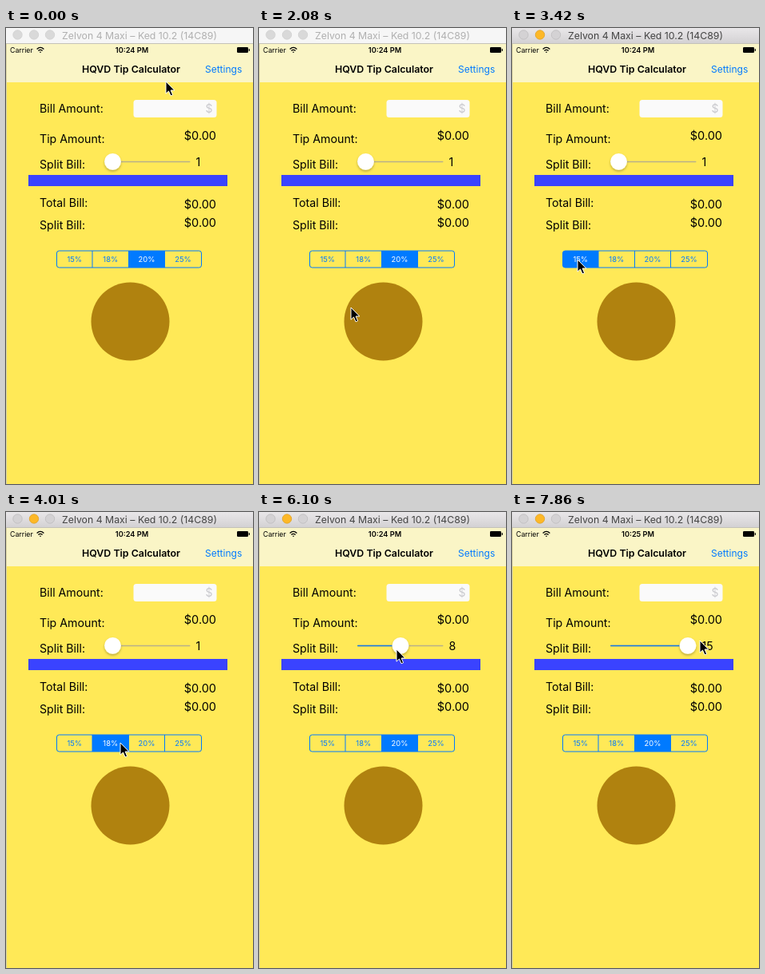
Write an HTML page that moves like this. It is 309 by 571 pixels and loops after 8000 ms.

```html
<!DOCTYPE html>
<html lang="en">
<head>
<meta charset="utf-8">
<title>Tip Calculator</title>
<style>
  html, body { margin: 0; width: 100%; height: 100%; overflow: hidden; background: #ffe957; }
  svg { display: block; width: 100%; height: 100%; }
  text { font-family: Inter, Roboto, "Liberation Sans", sans-serif; fill: #000; white-space: pre; }
  .label { font-size: 14.2px; }
  .value { font-size: 14.5px; text-anchor: end; }
  .heading { font-size: 12.4px; font-weight: 600; text-anchor: middle; }
  .status { font-size: 8.8px; }
  .clock { font-size: 9.2px; font-weight: 600; text-anchor: middle; }
  .link { font-size: 12px; fill: #007aff; }
  .hint { font-size: 14px; fill: #c9c9ce; text-anchor: end; }

  .bar { fill: #f6f6f6; }
  .caption { font-size: 12.3px; fill: #b0b0b0; }
  .dot { fill: #d9d9d9; stroke: #cecece; stroke-width: .8; }
  .active .bar { fill: url(#chrome); }
  .active .caption { fill: #444; }
  .active .dot { fill: #d4d2d4; stroke: #bdbbbd; }
  .active .dot.mid { fill: #fdb827; stroke: #dfa023; }

  .seg text { font-size: 9.4px; fill: #007aff; text-anchor: middle; }
  .seg rect { fill: transparent; }
  .seg.on rect { fill: #007aff; }
  .seg.on text { fill: #fff; }
  .outline { fill: none; stroke: #007aff; stroke-width: 1; }
</style>
</head>
<body>
<svg viewBox="0 0 309 571" preserveAspectRatio="none">
  <defs>
    <linearGradient id="chrome" x2="0" y2="1">
      <stop stop-color="#e9e7e9"/><stop offset="1" stop-color="#d3d1d3"/>
    </linearGradient>
    <clipPath id="pill"><rect x="63.5" y="279" width="181" height="21" rx="3"/></clipPath>
    <filter id="soft" x="-40%" y="-40%" width="180%" height="190%">
      <feDropShadow dx="0" dy="1.8" stdDeviation="1.4" flood-opacity=".28"/>
    </filter>
  </defs>

  <rect width="309" height="571" fill="#ffe957"/>
  <rect y="20" width="309" height="48" fill="#faf5c6"/>
  <rect y="20" width="1" height="551" fill="#d8d2a4"/>

  <g id="frame">
    <rect class="bar" width="309" height="19.5"/>
    <rect y="19" width="309" height="1" fill="#c4c2b8"/>
    <circle class="dot" cx="14.5" cy="8.5" r="5.7"/>
    <circle class="dot mid" cx="35" cy="8.5" r="5.7"/>
    <circle class="dot" cx="55" cy="8.5" r="5.7"/>
    <text class="caption" x="70" y="13.7">Zelvon 4 Maxi – Ked 10.2 (14C89)</text>
  </g>

  <text class="status" x="5" y="31">Carrier</text>
  <g fill="none" stroke="#000" stroke-width="1.3">
    <path d="M38.6 26.4Q43 22.4 47.4 26.4M40.4 28.5Q43 26.2 45.6 28.5"/>
    <circle cx="43" cy="30.2" r=".5" fill="#000" stroke-width=".6"/>
  </g>
  <text class="clock" id="clock" x="157.5" y="31">10:24 PM</text>
  <rect x="289" y="24" width="14" height="7" rx="1.2"/>
  <rect x="303.7" y="26" width="1.2" height="3" rx=".6"/>

  <text class="heading" x="156.5" y="56">HQVD Tip Calculator</text>
  <text class="link" x="249" y="56">Settings</text>

  <text class="label" x="42" y="106.3">Bill Amount:</text>
  <text class="label" x="42" y="143.5">Tip Amount:</text>
  <text class="label" x="42" y="175.7">Split Bill:</text>
  <text class="label" x="42" y="223.7">Total Bill:</text>
  <text class="label" x="42" y="251.5">Split Bill:</text>
  <rect x="159.5" y="90" width="104" height="22" rx="3.5" fill="#fafafa"/>
  <text class="hint" x="258.5" y="106">$</text>
  <text class="value" x="263" y="139.7">$0.00</text>
  <text class="value" x="263" y="226">$0.00</text>
  <text class="value" x="263" y="249.3">$0.00</text>

  <rect x="123" y="166.8" width="107.5" height="1.5" rx=".7" fill="#b9b08a"/>
  <rect id="fill" x="123" y="166.8" height="1.5" rx=".7" fill="#167be0"/>
  <circle id="thumb" cy="167.3" r="10.4" fill="#fff" filter="url(#soft)"/>
  <text class="label" id="count" x="237.5" y="173.2"></text>

  <rect x="28" y="184" width="249" height="14" fill="#3a43ff"/>

  <g id="segments" clip-path="url(#pill)"></g>
  <rect class="outline" x="63.5" y="279" width="181" height="21" rx="3"/>

  <circle cx="155.5" cy="367.5" r="49" fill="#b0820f"/>

  <path id="cursor" d="M0 0V15.2L3.5 12 6 17.8 8.6 16.7 6.1 11H10.8Z"
        fill="#000" stroke="#fff" stroke-width="1" stroke-linejoin="round"/>
</svg>

<script>
const LOOP = 8000, TICK = 148.3, LAST = 53;
const $ = id => document.getElementById(id);

// Pointer way-points: tick, x, y
const path = [
  [0, 200, 67], [1, 189, 79], [3, 145, 115], [4, 138, 138], [5, 168, 160],
  [6, 197, 166], [10, 197, 166], [12, 181, 255], [14, 115, 350], [15, 80, 354],
  [17, 48, 312], [18, 62, 295], [19, 77, 290], [20, 80, 289], [23, 82, 290],
  [25, 125, 291], [27, 143, 289], [29, 182, 292], [30, 186, 294], [31, 182, 280],
  [33, 148, 200], [35, 126, 170], [36, 124, 166], [37, 128, 167], [40, 168, 172],
  [41, 172, 172], [43, 212, 171], [44, 216, 171], [46, 177, 171], [48, 148, 171],
  [49, 143, 170], [50, 139, 169], [52, 200, 165], [53, 235, 161]
];

// Selected segment changes: tick, index
const picks = [[0, 2], [22, 0], [25, 1], [29, 2]];
const ACTIVATE = 21, GRAB = 36, MINUTE = 47;
const MIN = 133.5, MAX = 220;

const edges = [63.5, 108, 153.5, 198.5, 244.5];
$("segments").innerHTML = [15, 18, 20, 25].map((p, i) => {
  const x = edges[i], w = edges[i + 1] - x;
  return `<g class="seg"><rect x="${x}" y="279" width="${w}" height="21"/>
    <text x="${x + w / 2}" y="293">${p}%</text>
    <path class="outline" d="M${x} 279v21"/></g>`;
}).join("");
const segs = [...document.querySelectorAll(".seg")];

function pointer(n) {
  const i = Math.max(1, path.findIndex(p => p[0] >= n));
  const [a, x, y] = path[i - 1], [b, u, v] = path[i];
  const k = (n - a) / (b - a);
  return [x + (u - x) * k, y + (v - y) * k];
}

let shown = -1;
function draw(n) {
  const [x, y] = pointer(n);
  const knob = n < GRAB ? MIN : Math.min(MAX, Math.max(MIN, x + 5));
  const pick = picks.filter(p => p[0] <= n).pop()[1];
  $("cursor").setAttribute("transform", `translate(${x} ${y})`);
  $("thumb").setAttribute("cx", knob);
  $("fill").setAttribute("width", knob - 123);
  $("count").textContent = Math.floor(1 + 14 * (knob - MIN) / (MAX - MIN));
  $("clock").textContent = n < MINUTE ? "10:24 PM" : "10:25 PM";
  $("frame").classList.toggle("active", n >= ACTIVATE);
  segs.forEach((s, i) => s.classList.toggle("on", i === pick));
}

function run() {
  const n = Math.min(LAST, Math.floor((performance.now() % LOOP + 2) / TICK));
  if (n !== shown) draw(shown = n);
  requestAnimationFrame(run);
}
run();
</script>
</body>
</html>
```
